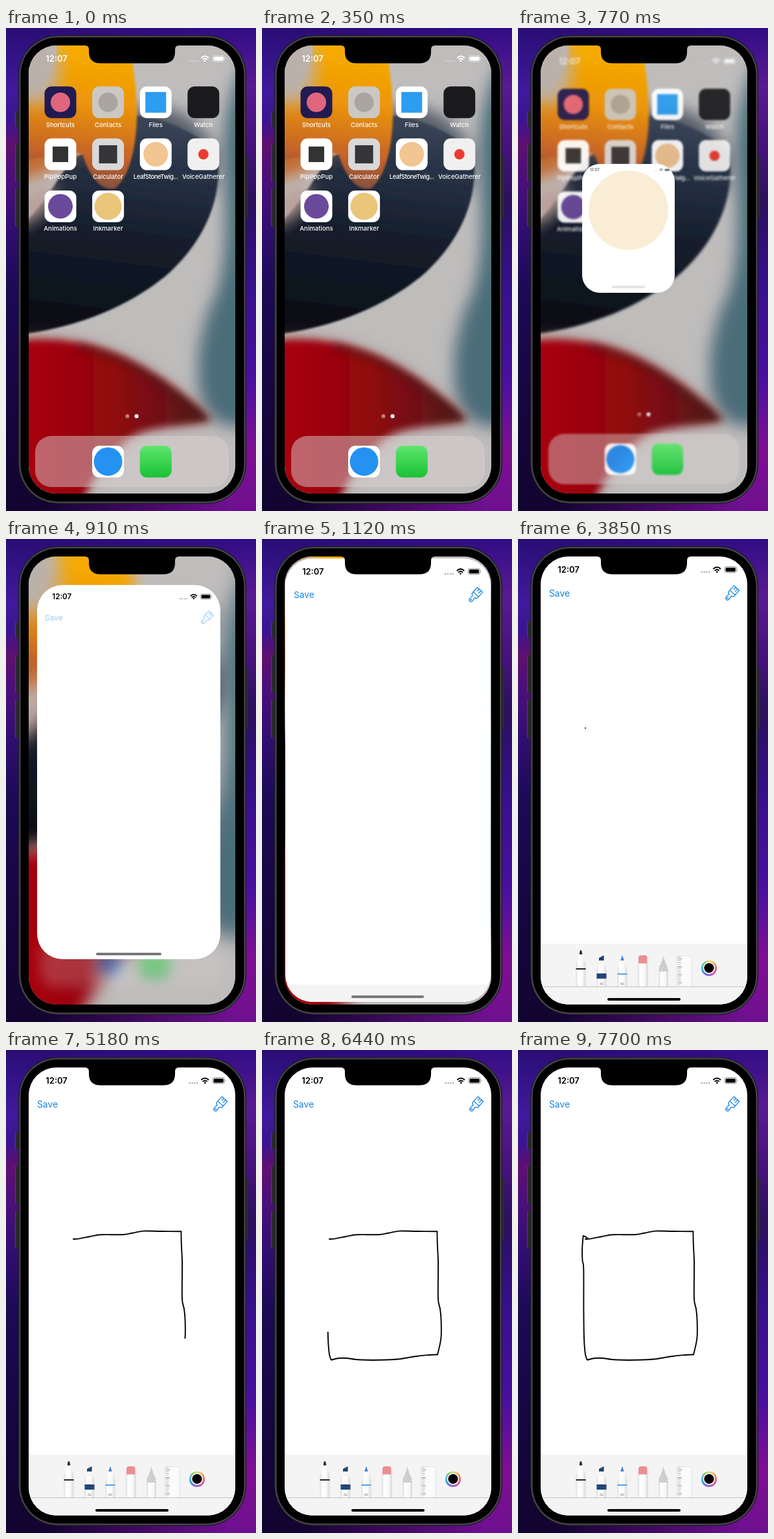
These frames come from a looping animation (386 by 746 pixels, 8000 ms). An HTML page:

```html
<!DOCTYPE html>
<html lang="en">
<head>
<meta charset="utf-8">
<title>Drawing app on a phone</title>
<style>
html, body { margin: 0; width: 100%; height: 100%; overflow: hidden; }
body {
  position: relative; font-family: Inter, "Liberation Sans", sans-serif;
  background: linear-gradient(#2a0d74, #3e1a9d 13%, #3a1490 19%, #5e1070 24%, #47107a 33%, #300d70 42%, #1c0a55 54%, #15063f 78%, #12042f);
}
body::before {
  content: ""; position: absolute; inset: 0;
  background: linear-gradient(#310d85, #5a1a92 12%, #47127c 24%, #2a1060 36%, #36108a 52%, #480fa0 72%, #7e1092 87%, #6e1090);
  -webkit-mask: linear-gradient(90deg, transparent 15%, #000 90%);
  mask: linear-gradient(90deg, transparent 15%, #000 90%);
}
svg { position: absolute; left: 0; top: 0; display: block; }
.key { position: absolute; width: 5px; background: #2b2a2e; border-radius: 2px; box-shadow: inset 1px 0 #4a484e; }
#phone {
  position: absolute; left: 19px; top: 11px; width: 352px; height: 724px; box-sizing: border-box;
  border-radius: 61px; background: #000; border: 1px solid #1b1a1e;
  box-shadow: inset 0 0 0 1px #3a393e, inset 0 0 0 2.5px #4a494e;
}
#screen {
  position: absolute; left: 35px; top: 27px; width: 319px; height: 692px;
  border-radius: 43px; overflow: hidden; background: #bfbcbc;
}
#wall, #home { overflow: visible; transform-origin: 50% 50%; }
#home { color: #fff; }
#app { position: absolute; overflow: hidden; background: #fff; color: #000; }
#view { width: 100%; height: auto; }
#cover { position: absolute; inset: 0 0 auto; aspect-ratio: 1; background: #fff; }
#cover::after { content: ""; position: absolute; inset: 7%; border-radius: 50%; background: #efd598; }
#bar {
  position: absolute; left: 32.3%; width: 35.4%; bottom: 6.5px; height: 4px; border-radius: 2px;
  background: #777; animation: bar 8s linear infinite;
}
@keyframes bar { 0%, 48.12% { background: #777; } 48.125%, 100% { background: #000; } }
#panel { animation: panel 8s linear infinite; }
@keyframes panel {
  0%, 13.1% { transform: translateY(95px); animation-timing-function: ease-out; }
  17.4%, 100% { transform: none; }
}
#tools { animation: tools 8s linear infinite; }
@keyframes tools {
  0%, 17.5% { transform: translateY(56px); animation-timing-function: ease-out; }
  21%, 100% { transform: none; }
}
.pen { animation: raise 8s linear infinite; }
.pencil { animation: lower 8s linear infinite; }
@keyframes raise {
  0%, 37.2% { transform: none; animation-timing-function: ease-out; }
  44.6%, 100% { transform: translateY(-8px); }
}
@keyframes lower {
  0%, 37.2% { transform: translateY(-8px); animation-timing-function: ease-out; }
  44.6%, 100% { transform: none; }
}
.ink { animation: ink 8s linear infinite; }
@keyframes ink { 0%, 39% { fill: #0a7af5; } 44.6%, 100% { fill: #000; } }
.wheel {
  width: 24px; height: 24px; border-radius: 50%;
  background: conic-gradient(#e8d84a, #f29a3c, #ee5a52, #e255a8, #9a62dc, #4a7df0, #3cbcd8, #56c878, #e8d84a);
}
</style>
</head>
<body>
<div class="key" style="left:14px;top:128px;height:25px"></div>
<div class="key" style="left:14px;top:179px;height:59px"></div>
<div class="key" style="left:14px;top:248px;height:59px"></div>
<div class="key" style="left:369px;top:198px;height:96px"></div>
<div id="phone"></div>

<div id="screen">
  <svg id="wall" width="319" height="692" viewBox="35 27 319 692">
    <defs>
      <linearGradient id="navy" gradientUnits="userSpaceOnUse" x1="230" y1="130" x2="190" y2="450">
        <stop stop-color="#3d4759"/><stop offset=".25" stop-color="#283346"/>
        <stop offset=".6" stop-color="#151e2c"/><stop offset="1" stop-color="#0a1018"/>
      </linearGradient>
      <linearGradient id="amber" gradientUnits="userSpaceOnUse" x1="150" y1="40" x2="125" y2="260">
        <stop stop-color="#f6ab00"/><stop offset=".35" stop-color="#ec9508"/>
        <stop offset=".72" stop-color="#c4622a"/><stop offset="1" stop-color="#6d4a45"/>
      </linearGradient>
      <linearGradient id="red" gradientUnits="userSpaceOnUse" x1="35" y1="0" x2="315" y2="0">
        <stop stop-color="#a8000e"/><stop offset=".5" stop-color="#8d0910"/><stop offset="1" stop-color="#4c1a1a"/>
      </linearGradient>
      <filter id="soft2" x="-20%" y="-20%" width="140%" height="140%"><feGaussianBlur stdDeviation="1.6"/></filter>
      <filter id="soft6" x="-20%" y="-20%" width="140%" height="140%"><feGaussianBlur stdDeviation="6"/></filter>
      <filter id="soft12" x="-50%" y="-50%" width="200%" height="200%"><feGaussianBlur stdDeviation="12"/></filter>
      <path id="fin" d="M0 486C125 466 220 515 318 606C250 618 212 610 178 642C145 680 125 700 105 760H0Z"/>
    </defs>
    <rect width="390" height="750" fill="#bfbcbc"/>
    <path d="M385 30C345 80 333 150 337 220C340 300 343 345 325 410C298 460 285 545 308 590C325 615 350 618 385 615Z" fill="#4b6d79" filter="url(#soft12)"/>
    <path d="M190 130C240 105 300 135 328 195L322 250L200 260Z" fill="#555d69" filter="url(#soft12)"/>
    <path d="M0 325C60 280 75 235 105 200C150 180 195 160 200 135C250 140 300 165 326 195C336 260 307 332 244 385C183 434 100 467 0 476Z" fill="url(#navy)" filter="url(#soft2)"/>
    <ellipse cx="40" cy="276" rx="46" ry="17" transform="rotate(-38 40 276)" fill="#b99c95" filter="url(#soft12)"/>
    <path d="M0 110L0 235C60 238 80 205 118 190L120 110Z" fill="#c26a33" filter="url(#soft12)"/>
    <path d="M75 0C85 60 70 85 0 110L0 205C60 205 90 185 118 195C130 232 148 252 168 248C194 228 203 170 202 125C200 80 196 50 186 0Z" fill="url(#amber)" filter="url(#soft2)"/>
    <ellipse cx="45" cy="62" rx="38" ry="56" fill="#bbb1aa" filter="url(#soft12)"/>
    <use href="#fin" fill="#a2625e" filter="url(#soft12)"/>
    <use href="#fin" fill="url(#red)" filter="url(#soft6)"/>
    <path d="M110 492C180 505 240 545 300 600" fill="none" stroke="#4a1717" stroke-width="10" opacity=".55" filter="url(#soft6)"/>
  </svg>

  <svg id="home" width="319" height="692" viewBox="35 27 319 692">
    <defs>
      <g id="status" fill="currentColor">
        <text x="61.3" y="52" font-size="13" font-weight="600">12:07</text>
        <g opacity=".32"><circle cx="283.6" cy="51" r="1.3"/><circle cx="287.5" cy="51" r="1.3"/><circle cx="291.4" cy="51" r="1.3"/><circle cx="295.3" cy="51" r="1.3"/></g>
        <path d="M301.4 46.3Q307.2 40.7 313 46.3M303.7 48.8Q307.2 45.6 310.7 48.8" fill="none" stroke="currentColor" stroke-width="2"/>
        <path d="M305.3 50.3Q307.2 48.9 309.1 50.3L307.2 52.4Z"/>
        <rect x="319" y="42.7" width="18.4" height="9.2" rx="2.8" fill="none" stroke="currentColor" opacity=".45"/>
        <rect x="320.5" y="44.2" width="15.4" height="6.2" rx="1.6"/>
        <path d="M338.6 45.7q1.6 1.6 0 3.2z" opacity=".5"/>
      </g>
      <linearGradient id="green" x2="0" y2="1"><stop stop-color="#5fe66c"/><stop offset="1" stop-color="#18c236"/></linearGradient>
    </defs>
    <use href="#status" id="clock"/>
    <rect x="45" y="630" width="299" height="79" rx="25" fill="#d9d3d2" opacity=".48"/>
    <circle cx="187.3" cy="599.5" r="3.1" fill="#fff" opacity=".45"/>
    <circle cx="201.6" cy="599.5" r="3.1" fill="#fff"/>
    <g id="icons" fill="#fff" font-size="9.6" font-weight="500" text-anchor="middle"></g>
  </svg>

  <div id="app">
    <svg id="view" viewBox="35 27 319 692">
      <defs>
        <linearGradient id="tube"><stop stop-color="#dedede"/><stop offset=".25" stop-color="#fff"/><stop offset=".65" stop-color="#fafafa"/><stop offset="1" stop-color="#d8d8d8"/></linearGradient>
        <pattern id="hatch" width="3" height="3" patternUnits="userSpaceOnUse" patternTransform="rotate(-40)"><rect width="3" height="3" fill="#eee"/><rect width="3" height="1.4" fill="#aaa"/></pattern>
        <clipPath id="tray"><rect x="35" y="625" width="319" height="66"/></clipPath>
        <path id="shaft" d="M-2.4 6H2.4C3.2 12 7.5 17 7.5 24V70H-7.5V24C-7.5 17-3.2 12-2.4 6Z" fill="url(#tube)"/>
      </defs>
      <use href="#status"/>
      <g id="nav">
        <text x="48" y="88.7" font-size="13.8" fill="#1583e0">Save</text>
        <g transform="translate(329.8 84.3) rotate(42)" fill="none" stroke="#1583e0" stroke-width="1.3" stroke-linejoin="round" stroke-linecap="round">
          <path d="M-5.5-11.5H5.5V0Q5.5 2.5 2.3 3L2.8 9.5A2.8 2.8 0 0 1-2.8 9.5L-2.3 3Q-5.5 2.5-5.5 0ZM-5.5-2H5.5M-1.8-11.5V-7.5M2-11.5V-6"/>
          <circle cy="9.3" r=".6"/>
        </g>
      </g>
      <path id="stroke" fill="none" stroke="#000" stroke-width="1.9" stroke-linecap="round" stroke-linejoin="round"/>
      <g id="panel">
        <rect x="35" y="625" width="319" height="100" fill="#f4f4f4"/>
        <g clip-path="url(#tray)"><g id="tools">
          <g transform="translate(97 643)"><g class="pen">
            <use href="#shaft"/><path d="M-2.4 6.5L-1 .6Q0-.6 1 .6L2.4 6.5Z" fill="#222"/>
            <rect x="-7.5" y="28" width="15" height="2" fill="#222"/>
          </g></g>
          <g transform="translate(129 643)">
            <use href="#shaft"/><path d="M-4 8V4L3.6 0V8Z" fill="#24436b"/><path d="M-4 8H3.8L5.8 15H-5.8Z" fill="#f6f6f6"/>
            <rect x="-7.5" y="28" width="15" height="8" fill="#24457c"/>
            <text y="46" font-size="5" fill="#777" text-anchor="middle">80</text>
          </g>
          <g transform="translate(161 643)"><g class="pencil">
            <use href="#shaft"/><path d="M-2.7 8L0-.3L2.7 8Z" fill="#3d86d6"/>
            <rect x="-7.5" y="28" width="15" height="1.8" fill="#4a9be6"/>
            <text y="46" font-size="5" fill="#777" text-anchor="middle">80</text>
          </g></g>
          <g transform="translate(192.8 643)">
            <rect x="-8" y="12" width="16" height="60" fill="url(#tube)"/>
            <path d="M-6.8 12.5V4Q-6.8 0-2.8 0H2.8Q6.8 0 6.8 4V12.5Z" fill="#ea8f8f"/>
          </g>
          <g transform="translate(224.5 643)">
            <rect x="-7.5" y="23" width="15" height="50" fill="url(#tube)"/>
            <path d="M0 0Q1.5 8 6.8 19V25H-6.8V19Q-1.5 8 0 0Z" fill="url(#hatch)"/>
          </g>
          <rect x="245.5" y="643.5" width="22.5" height="60" rx="2" fill="#fbfbfb" stroke="#dcdcdc" stroke-width=".8"/>
          <path d="M249 645V691" stroke="#999" stroke-width="5" stroke-dasharray=".7 2.4"/>
          <path d="M250 648V691" stroke="#777" stroke-width="7" stroke-dasharray=".8 11.6"/>
          <foreignObject x="283" y="650.5" width="24" height="24"><div class="wheel"></div></foreignObject>
          <circle cx="295" cy="662.5" r="9.4" fill="#f9f9f9"/>
          <circle class="ink" cx="295" cy="662.5" r="7.6"/>
        </g></g>
        <path d="M35 691.5H354" stroke="#c2c2c2"/>
      </g>
    </svg>
    <div id="cover"></div>
    <div id="bar"></div>
  </div>
</div>

<svg width="386" height="746"><path d="M122 26v1q6 0 6 6v4q0 17.500 18 17.500h97q18 0 18-17.500v-4q0-6 6-6v-1z"/></svg>

<script>
const $ = id => document.getElementById(id);
const LOOP = 8000, PRESS = 630, OPEN = 695.5, OPENED = 1400;
const mix = (a, b, k) => a + (b - a) * k;
const ramp = (t, a, b) => Math.min(1, Math.max(0, (t - a) / (b - a)));

// column, row, label, tile colour, mark colour, mark size, mark corner radius
const apps = [
  [0, 0, 'Shortcuts', '#211b52', '#e0667f', 30, 15],
  [1, 0, 'Contacts', '#cbc8c3', '#aaa59f', 30, 15],
  [2, 0, 'Files', '#fff', '#2c9df0', 32, 0],
  [3, 0, 'Watch', '#1b1b1d', '#1b1b1d', 0, 0],
  [0, 1, 'PipPopPup', '#fff', '#333', 24, 0],
  [1, 1, 'Calculator', '#d9d9d9', '#35353a', 28, 0],
  [2, 1, 'LeafStoneTwig...', '#fff', '#f2c592', 38, 19],
  [3, 1, 'VoiceGatherer', '#f1f0f0', '#ec3c2f', 16, 8],
  [0, 2, 'Animations', '#fff', '#6b4a9c', 38, 19],
  [1, 2, 'Inkmarker', '#fff', '#e9c67a', 42, 21],
  [1, 6.91, '', '#fff', '#2592f2', 44, 22],
  [2, 6.91, '', 'url(#green)', 'none', 0, 0]
];
$('icons').innerHTML = apps.map(([col, row, label, tile, color, size, r]) => `
  <g transform="translate(${84 + 73.6 * col} ${114.8 + 80.3 * row})">
    <g class="tile"><rect x="-24.5" y="-24.5" width="49" height="49" rx="11" fill="${tile}"/>
    <rect x="${-size / 2}" y="${-size / 2}" width="${size}" height="${size}" rx="${r}" fill="${color}"/></g>
    <text y="38" letter-spacing="${label.length > 14 ? -.5 : 0}">${label}</text>
  </g>`).join('');
const tapped = document.querySelectorAll('.tile')[9];

// sides of the sketched square: x, y, time of arrival, time of leaving
const sides = [
  [[104, 292, 3850, 4000], [113, 291.4], [130, 288], [147, 285.3], [180, 285.2], [195, 282.8], [212, 279.6], [240, 280], [270, 280.2]],
  [[270.4, 282], [270.8, 300], [272, 325], [272, 345, 4830], [272, 385], [275, 400], [276.5, 416], [276.4, 445, 5180], [271, 470.5]],
  [[258, 471], [235, 473.5], [210, 477.5], [182, 478.8], [160, 478.8, 5670], [145, 478], [130, 476], [117, 476.2], [107, 478.8, 6160, 6230]],
  [[104, 470], [102, 445], [101.4, 400], [101.3, 338], [99.5, 325], [99.2, 306, 7070], [100.7, 287, 7350, 7420]],
  [[104, 288.4, 7560, 7630], [107.5, 290.8, 7700]]
];
const stroke = $('stroke'), keys = [];
let path = '', last;
for (const side of sides) {
  const pts = last ? [last, ...side] : side;
  pts.forEach((p, i) => {
    if (!i) {
      if (last) return;
      path = `M${p[0]} ${p[1]}`;
    } else {
      const a = pts[i - 1], before = pts[i - 2] || a, after = pts[i + 1] || p;
      const c = [0, 1].map(k => a[k] + (p[k] - before[k]) / 6);
      const d = [0, 1].map(k => p[k] - (after[k] - a[k]) / 6);
      path += `C${c} ${d} ${p[0]} ${p[1]}`;
    }
    stroke.setAttribute('d', path);
    const length = i ? stroke.getTotalLength() : 0;
    for (const time of p.slice(2)) keys.push([time, length]);
  });
  last = pts[pts.length - 1];
}

function inkLength(t) {
  const i = keys.findIndex(k => k[0] > t);
  if (i < 0) return keys[keys.length - 1][1];
  const [a, b] = [keys[i - 1], keys[i]];
  return mix(a[1], b[1], ramp(t, a[0], b[0]));
}

function drawOpening(t) {
  const s = .0165 * Math.max(0, t - OPEN);
  const p = t >= OPENED ? 1 : 1 - (1 + s) * Math.exp(-s);
  const w = mix(49, 319, p), h = mix(49, 692, p ** 1.38);
  const style = $('app').style;
  style.visibility = t < OPEN ? 'hidden' : 'visible';
  style.width = w + 'px';
  style.height = h + 'px';
  style.left = mix(122.5, 159.5, p) - w / 2 + 'px';
  style.top = mix(248.5, 346, p) - h / 2 + 'px';
  style.borderRadius = mix(11, 42, p ** .6) + 'px';
  $('cover').style.opacity = Math.max(0, 1 - 1.7 * p);
  $('nav').style.opacity = ramp(t, 850, 1000);
  $('bar').style.opacity = ramp(t, 740, 900);

  const blur = p ? `blur(${14 * p * p}px)` : 'none';
  $('wall').style.filter = $('home').style.filter = blur;
  $('wall').style.visibility = $('home').style.visibility = t < OPENED ? 'visible' : 'hidden';
  $('home').style.transform = `scale(${1 - .06 * p ** 1.5})`;
  $('home').style.opacity = 1 - .65 * p * p;
  $('clock').style.opacity = 1 - p * p;
  tapped.style.filter = t >= PRESS && t < OPEN ? 'brightness(.7)' : 'none';
  tapped.style.opacity = t < OPEN ? 1 : 0;
}

function drawStroke(t) {
  const shown = t >= keys[0][0];
  stroke.style.display = shown ? '' : 'none';
  if (shown) stroke.style.strokeDasharray = `${Math.max(.01, inkLength(t))} 2000`;
}

let start;
function tick(now) {
  start ??= now;
  const t = (now - start) % LOOP;
  drawOpening(t);
  drawStroke(t);
  requestAnimationFrame(tick);
}
requestAnimationFrame(tick);
</script>
</body>
</html>
```
